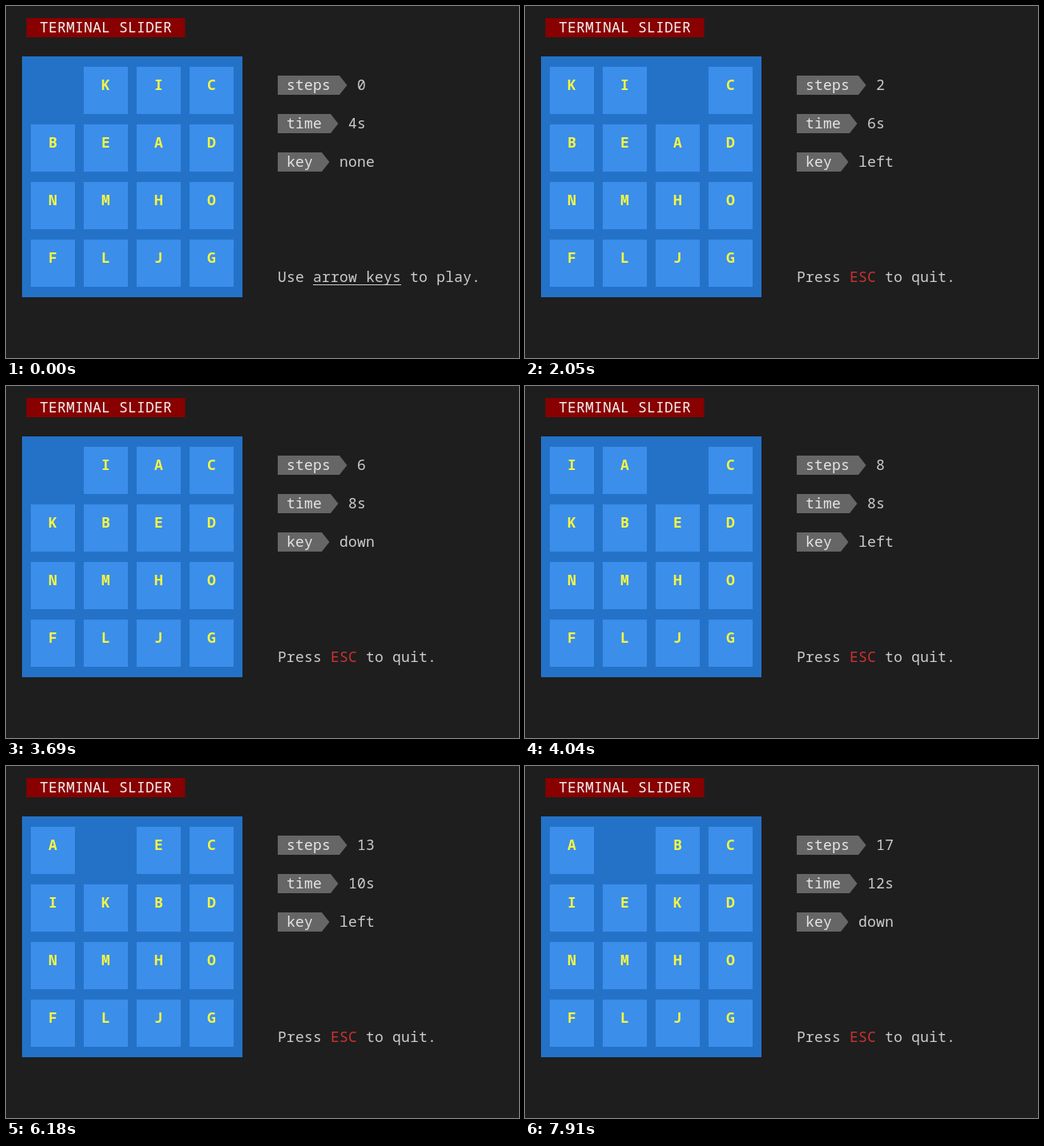
An HTML page with a canvas for the animation above (8 s loop, 640 by 440 pixels).

```html
<!DOCTYPE html>
<html lang="en">
<head>
<meta charset="utf-8">
<title>Terminal Slider</title>
<style>
html, body { margin: 0; width: 100%; height: 100%; overflow: hidden; background: #1e1e1e; }
canvas { display: block; }
</style>
</head>
<body>
<canvas id="stage" width="640" height="440"></canvas>
<script>
const ctx = document.getElementById('stage').getContext('2d');
const LOOP = 8000;
const CELL = 11, LINE = 24;
const PANEL_X = 339;
const FONT = '"Noto Sans Mono", "DejaVu Sans Mono", monospace';
const START = ' KICBEADNMHOFLJG';

// Key presses: the named key pushes a tile that way into the gap.
const MOVES = [
  [1810, 'left'], [2050, 'left'], [2560, 'up'], [3070, 'right'],
  [3270, 'right'], [3690, 'down'], [3960, 'left'], [4040, 'left'],
  [4730, 'up'], [4940, 'right'], [5650 + 120, 'right'], [6040, 'down'],
  [6180, 'left'], [6360, 'left'], [6810, 'up'], [7700, 'right'], [7910, 'down']
];
const GAP_STEP = { left: 1, right: -1, up: 4, down: -4 };
const TICKS = [740, 1730, 2650, 3690, 4730, 5650, 6630, 7700];

function stateAt(t) {
  const tiles = [...START];
  let gap = 0, steps = 0, key = 'none';
  for (const [at, dir] of MOVES) {
    if (at > t) break;
    const from = gap + GAP_STEP[dir];
    tiles[gap] = tiles[from];
    tiles[from] = ' ';
    gap = from;
    key = dir;
    steps++;
  }
  const seconds = 4 + TICKS.filter(at => at <= t).length;
  return { tiles, steps, key, seconds };
}

function rect(x, y, w, h, color) {
  ctx.fillStyle = color;
  ctx.fillRect(x, y, w, h);
}

// Sets text on the terminal grid and returns the x after the last cell.
function print(str, x, top, color, weight = 400) {
  ctx.font = `${weight} 18px ${FONT}`;
  ctx.textAlign = 'center';
  ctx.textBaseline = 'alphabetic';
  ctx.fillStyle = color;
  for (const ch of str) {
    ctx.fillText(ch, x + CELL / 2, top + 18);
    x += CELL;
  }
  return x;
}

function drawBoard(tiles) {
  rect(20, 63, 275, 301, '#2472c8');
  tiles.forEach((ch, i) => {
    if (ch === ' ') return;
    const x = 31 + (i % 4) * 66;
    const y = 76 + Math.floor(i / 4) * 72;
    rect(x, y, 55, 59, '#3b8eea');
    print(ch, x + 2 * CELL, y + 11, '#f5f543', 700);
  });
}

function drawField(label, value, top) {
  const end = PANEL_X + (label.length + 2) * CELL;
  rect(PANEL_X, top, end - PANEL_X, LINE, '#666666');
  ctx.beginPath();
  ctx.moveTo(end - 1, top);
  ctx.lineTo(end, top);
  ctx.lineTo(end + 9.5, top + LINE / 2);
  ctx.lineTo(end, top + LINE);
  ctx.lineTo(end - 1, top + LINE);
  ctx.fill();
  print(label, PANEL_X + CELL, top, '#e5e5e5');
  print(String(value), end + 2 * CELL, top, '#cccccc');
}

function drawMessage(started) {
  const top = 327, grey = '#cccccc';
  if (started) {
    let x = print('Press ', PANEL_X, top, grey);
    x = print('ESC', x, top, '#cd3131');
    print(' to quit.', x, top, grey);
  } else {
    const from = print('Use ', PANEL_X, top, grey);
    const to = print('arrow keys', from, top, grey);
    rect(from, 348, to - from, 1, grey);
    print(' to play.', to, top, grey);
  }
}

function draw(t) {
  const s = stateAt(t);
  rect(0, 0, 640, 440, '#1e1e1e');
  rect(25.5, 15, 198, LINE, '#880000');
  print('TERMINAL SLIDER', 42, 15, '#f2f2f2');
  drawBoard(s.tiles);
  drawField('steps', s.steps, 87);
  drawField('time', s.seconds + 's', 135);
  drawField('key', s.key, 183);
  drawMessage(s.steps > 0);
}

const begin = performance.now();
function frame() {
  draw((performance.now() - begin) % LOOP);
  requestAnimationFrame(frame);
}
frame();
</script>
</body>
</html>
```
